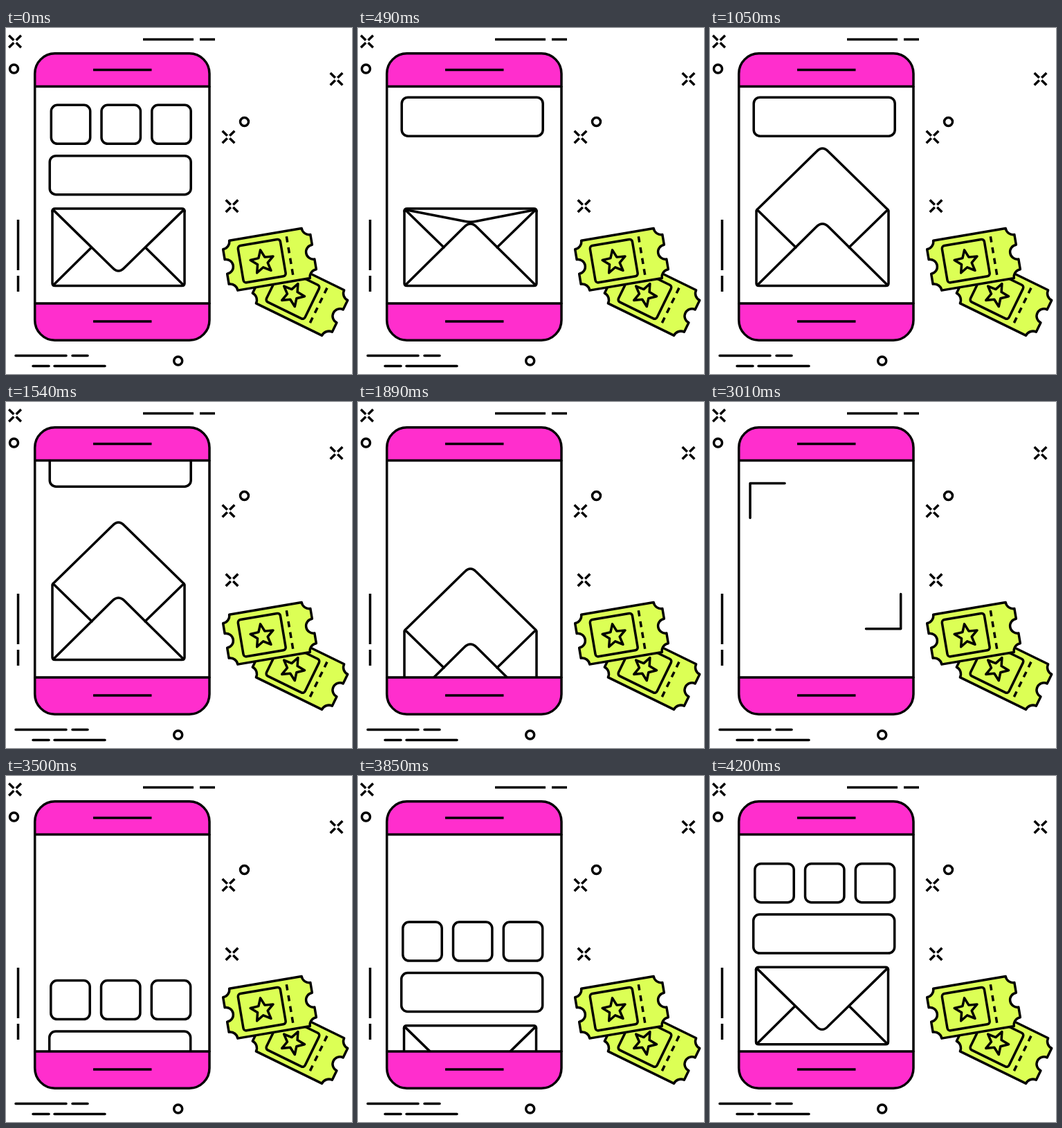
These frames come from a looping animation (500 px wide and 500 px high, 4270 ms). An HTML page:

```html
<!DOCTYPE html>
<html lang="en">
<head>
<meta charset="utf-8">
<title>Phone and tickets</title>
<style>
  html, body { margin: 0; width: 100%; height: 100%; overflow: hidden; background: #fff; }
  svg { display: block; width: 100vw; height: 100vh; }
  .ink { fill: none; stroke: #000; stroke-width: 3.5; stroke-linejoin: round; }
  .round { stroke-linecap: round; }
  .white { fill: #fff; }
  .pink { fill: #ff2ecd; }
  .lime { fill: #dcff55; }
</style>
</head>
<body>
<svg viewBox="0 0 500 500">
  <defs>
    <clipPath id="screen"><rect x="43" y="84" width="250" height="314"/></clipPath>
    <path id="cross" d="M-8.8-8.8L-1.7-1.7M8.8-8.8L1.7-1.7M-8.8 8.8L-1.7 1.7M8.8 8.8L1.7 1.7"/>
    <g id="ticket">
      <path class="lime" d="M-53-36.5H53A11 11 0 0 0 64-25.5V-10.5A10.5 10.5 0 0 0 64 10.5V25.5A11 11 0 0 0 53 36.5H-53A11 11 0 0 0-64 25.5V10.5A10.5 10.5 0 0 0-64-10.5V-25.5A11 11 0 0 0-53-36.5Z"/>
      <rect x="-42.5" y="-26.5" width="62" height="54" rx="4"/>
      <path d="M29.5-28.5V28.5" stroke-dasharray="8.5 7.4"/>
      <path id="star"/>
    </g>
  </defs>

  <g class="ink">
    <path d="M198 16.5H271M280 16.5H302M17.5 277V350M17.5 358V381"/>
    <path class="round" d="M14 473.5H87M96 473.5H118M39 488.5H62M70 488.5H143"/>
    <circle cx="11.5" cy="59" r="6"/>
    <circle cx="344.5" cy="135.5" r="6"/>
    <circle cx="248.7" cy="481" r="6"/>
    <use href="#cross" x="13" y="19.5"/>
    <use href="#cross" x="477.5" y="73.7"/>
    <use href="#cross" x="321.5" y="157.5"/>
    <use href="#cross" x="326.5" y="257.3"/>
    <use href="#ticket" transform="translate(425 388.3) rotate(26)"/>
    <use href="#ticket" transform="translate(381 334.3) rotate(-9.6)"/>
  </g>

  <g class="ink" clip-path="url(#screen)">
    <g id="tiles">
      <rect x="65.3" y="111.3" width="56.4" height="56" rx="9"/>
      <rect x="138" y="111.3" width="56.4" height="56" rx="9"/>
      <rect x="210.8" y="111.3" width="56.4" height="56" rx="9"/>
      <rect x="63.2" y="184.7" width="204" height="56" rx="9"/>
    </g>
    <g id="envelope" class="round">
      <path d="M67 264V369Q67 372.5 71 372.5H254Q258 372.5 258 369V264"/>
      <path d="M68.5 371.5L153.5 287.5Q162.5 278.5 171.5 287.5L256.5 371.5"/>
      <path d="M68 262.5L124 317M257 262.5L201 317"/>
      <path id="flap" class="white"/>
      <path id="lip" d="M67 265Q67 261 71 261H254Q258 261 258 265"/>
    </g>
    <path id="brackets" class="round" d="M58 167.5V117.5H108M275.7 277.5V327.7H225.5"/>
  </g>

  <g class="ink">
    <path class="pink" d="M41.7 84.5V66A29 29 0 0 1 70.7 36.8H265A29 29 0 0 1 294 66V84.5Z"/>
    <path class="pink" d="M41.7 398V422A29 29 0 0 0 70.7 451.2H265A29 29 0 0 0 294 422V398Z"/>
    <path d="M41.7 84V399M294 84V399M126 60.5H210.5M126 424H210.5"/>
  </g>
</svg>
<script>
const LOOP = 4270, STEP = 70, SPEED = 0.2414;
const $ = id => document.getElementById(id);

// Linear interpolation through [time, value] pairs, held at both ends.
function track(keys, t) {
  if (t <= keys[0][0]) return keys[0][1];
  for (let i = 1; i < keys.length; i++) {
    const [t0, a] = keys[i - 1], [t1, b] = keys[i];
    if (t <= t1) return a + (b - a) * (t - t0) / (t1 - t0);
  }
  return keys[keys.length - 1][1];
}

const TILES = [[0, 0], [350, -84.5], [1400, -84.5], [1610, -135.5], [1680, -160]];
const FLAP = [[350, 1], [700, -1]];
const ZOOM = [[2590, 0.8], [2800, 1], [2940, 1.065], [3010, 1]];
const ENTER = 3075, SETTLED = 4263.5, DROP = 1612;

function flapPath(s) {
  const y = d => 262.5 + s * d;
  return `M68 262.5L154 ${y(84)}Q162.5 ${y(93)} 171 ${y(84)}L257 262.5`;
}

function draw(t) {
  const entering = t >= ENTER;
  const rise = Math.max(0, (SETTLED - t) * SPEED);
  const x = entering ? -0.5 : 0;
  const tilesY = entering ? rise : track(TILES, t);
  const envelopeY = entering ? rise : Math.max(0, (t - DROP) * SPEED);
  const open = entering ? 1 : track(FLAP, t);

  $("tiles").setAttribute("transform", `translate(${x} ${tilesY})`);
  $("envelope").setAttribute("transform", `translate(${x} ${envelopeY})`);
  $("flap").setAttribute("d", flapPath(open));
  $("lip").style.display = open > 0 ? "" : "none";

  $("brackets").style.display = t >= 2590 && t < 3080 ? "" : "none";
  $("brackets").setAttribute("transform",
    `translate(167 222.6) scale(${track(ZOOM, t)}) translate(-167 -222.6)`);
}

const star = Array.from({ length: 10 }, (_, i) => {
  const r = i % 2 ? 7.8 : 17.5, a = (i / 5 - 0.5) * Math.PI;
  return `${(-11 + r * Math.cos(a)).toFixed(2)} ${(2 + r * Math.sin(a)).toFixed(2)}`;
});
$("star").setAttribute("d", `M${star.join("L")}Z`);

const start = performance.now();
function tick() {
  const t = Math.max(0, performance.now() - start) % LOOP;
  draw(Math.floor(t / STEP) * STEP);
  requestAnimationFrame(tick);
}
draw(0);
requestAnimationFrame(tick);
</script>
</body>
</html>
```
